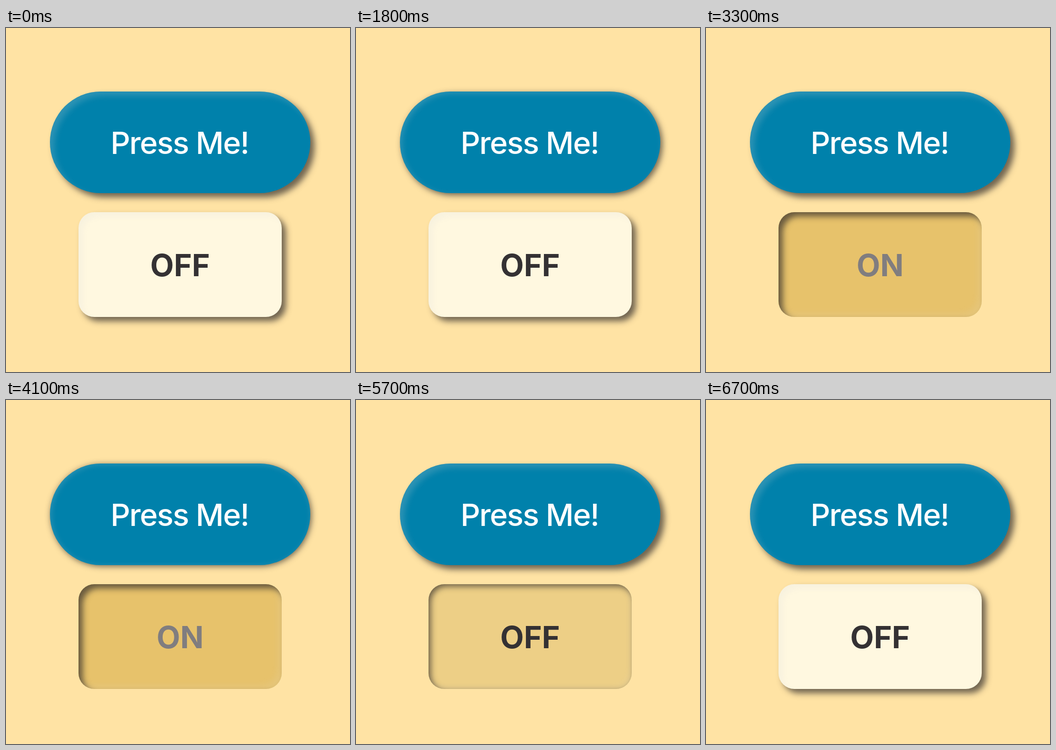
Write an HTML page that moves like this. It is 650 by 650 pixels and loops after 6800 ms.

```html
<!DOCTYPE html>
<html lang="en">
<head>
<meta charset="utf-8">
<title>Soft buttons</title>
<style>
  html, body { margin: 0; width: 100%; height: 100%; overflow: hidden; background: #ffe3a4; }
  .key { position: absolute; }
  #push { left: 83px; top: 120px; width: 492px; height: 192px; border-radius: 96px; background: #0081ab; }
  #toggle { left: 137px; top: 348px; width: 384px; height: 198px; border-radius: 30px; }
  svg { position: absolute; left: 0; top: 0; }
  text { font-family: Inter, sans-serif; font-size: 58px; text-anchor: middle; }
  #caption { letter-spacing: -.027em; }
</style>
</head>
<body>
<div id="push" class="key"></div>
<div id="toggle" class="key"></div>
<svg width="650" height="650" viewBox="0 0 650 650">
  <text id="caption" x="328" y="237.5" font-weight="500" fill="#fff">Press Me!</text>
  <text id="label" x="329" y="469" font-weight="700"></text>
</svg>
<script>
const LOOP = 6800, STEP = 100, TRAVEL = 300;
const DEPTH = 8, BLUR = 12;
const DARK = 'rgba(45,42,42,.68)', LIGHT = 'rgba(221,221,221,.2)', FAINT = 'rgba(221,221,221,.12)';
const OFF = [255, 248, 224], ON = [231, 194, 107];
const push = document.getElementById('push');
const toggle = document.getElementById('toggle');
const label = document.getElementById('label');

const ramp = (t, start) => Math.min(1, Math.max(0, (t - start) / TRAVEL));
const pressed = (t, down, up) => ramp(t, down) - ramp(t, up);

// Raised up to the halfway point, sunken past it; the offset is zero in between.
function relief(q) {
  const d = DEPTH * Math.abs(1 - 2 * q);
  const at = (n, color) => `${n}px ${n}px ${BLUR}px ${color}`;
  return q < 0.5
    ? `${at(d, DARK)}, inset ${at(d, LIGHT)}`
    : `inset ${at(d, DARK)}, inset ${at(-d, FAINT)}`;
}

function draw(t) {
  const first = pressed(t, 1070, 1575), second = pressed(t, 3990, 4670);
  push.style.boxShadow = relief(first + second);

  const q = pressed(t, 2470, 5630);
  const on = t >= 2470 && t < 5630;
  toggle.style.boxShadow = relief(q);
  toggle.style.backgroundColor = `rgb(${OFF.map((c, i) => Math.round(c + (ON[i] - c) * q))})`;
  label.textContent = on ? 'ON' : 'OFF';
  label.setAttribute('fill', on ? '#807d7f' : '#343133');
}

const begin = performance.now();
function tick() {
  const t = (performance.now() - begin) % LOOP;
  draw(Math.floor(t / STEP) * STEP);
  requestAnimationFrame(tick);
}
tick();
</script>
</body>
</html>
```
